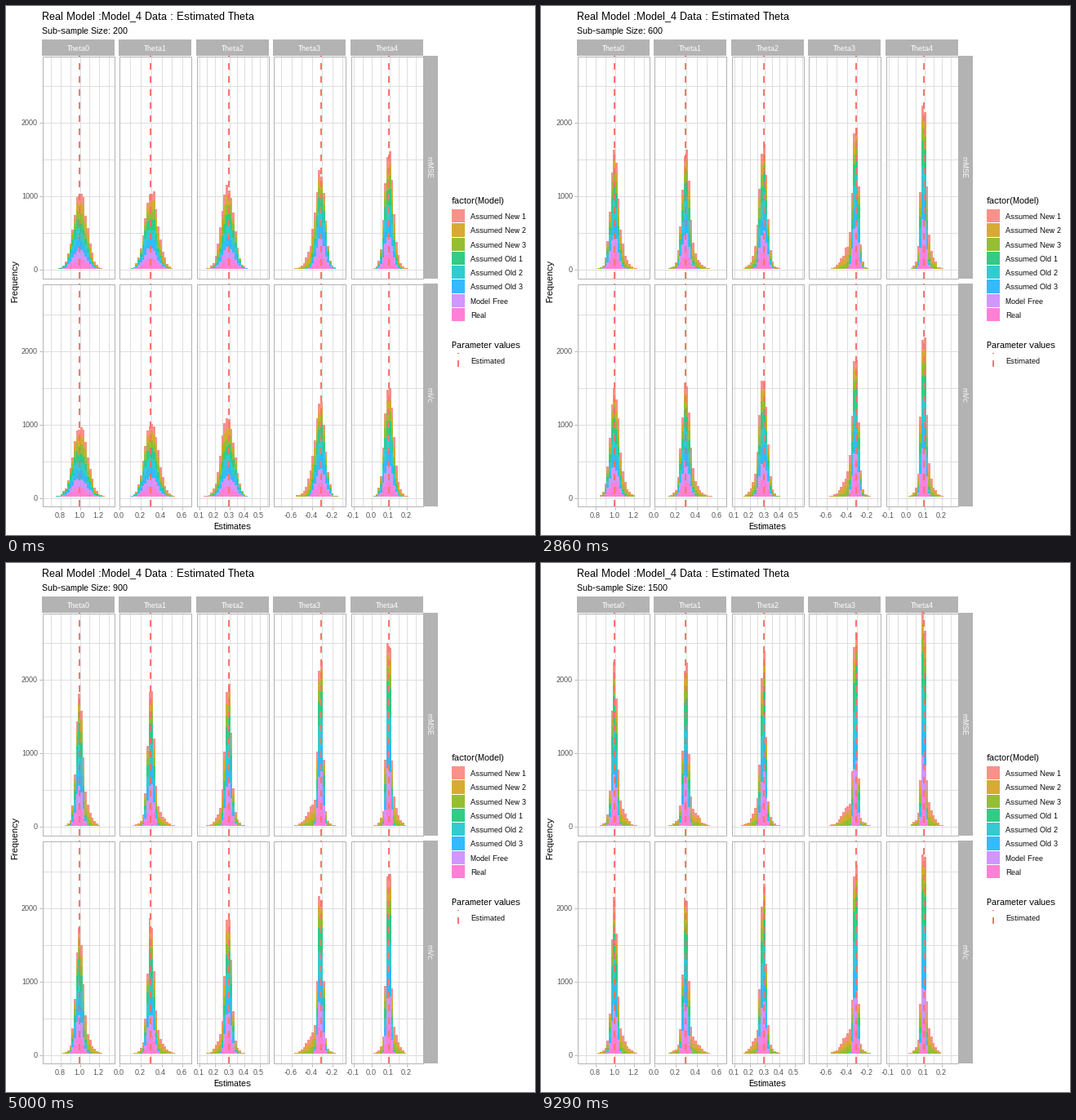
Animation of 648 by 648 pixels, one loop 10000 ms. Source, as a matplotlib script:

```python
import math
import numpy as np
import matplotlib as mpl
import matplotlib.pyplot as plt
from matplotlib.animation import FuncAnimation
from matplotlib.collections import LineCollection, PolyCollection
from matplotlib.patches import Rectangle

mpl.rcParams["font.family"] = "Liberation Sans"
mpl.rcParams["text.hinting"] = "native"
mpl.rcParams["text.hinting_factor"] = 1

SIZE, DPI = 648, 72
LOOP, TICK, STEPS = 10000, 40, 14
GREY, GRID, AXIS_TEXT, RED = "#B3B3B3", "#DEDEDE", "#4D4D4D", "#F8766D"
MODELS = {
    "Assumed New 1": "#F8766D", "Assumed New 2": "#CD9600",
    "Assumed New 3": "#7CAE00", "Assumed Old 1": "#00BE67",
    "Assumed Old 2": "#00BFC4", "Assumed Old 3": "#00A9FF",
    "Model Free": "#C77CFF", "Real": "#FF61CC",
}
LEFT, PITCH, WIDTH = 44.25, 94.45, 89.0
BASES = (322.4, 601.6)
UP, DOWN, SCALE = 261.2, 12.3, 0.09
BINS, BIN_W, INSET = 30, 2.7, 4.05

# per column: reference value, its x, px per unit, major step, labelled values, line x
AXES = [
    (1.0, 90.2, 117.5, 0.2, (0.8, 1.0, 1.2), 90),
    (0.0, 138.8, 128.3, 0.2, (0.0, 0.2, 0.4, 0.6), 177),
    (0.3, 273.4, 183.5, 0.1, (0.1, 0.2, 0.3, 0.4, 0.5), 273),
    (-0.4, 374.3, 125.0, 0.2, (-0.6, -0.4, -0.2), 386),
    (0.0, 447.3, 218.0, 0.1, (-0.1, 0.0, 0.1, 0.2), 469),
]
# per column: centre, spread at size 200, tail shift, tail spread, tail share,
# and widening of the second row
SHAPES = [
    (90.3, 7.9, 4.0, 8.0, 0.82, 1.08),
    (177.7, 7.4, 4.0, 8.8, 0.82, 1.05),
    (272.9, 7.2, -3.0, 8.0, 0.82, 1.03),
    (385.8, 5.45, -6.5, 8.5, 0.82, 1.03),
    (469.2, 4.75, 2.5, 6.8, 0.86, 1.03),
]
NEW_SHIFT = (1.1, 1.25, 0.65)

fig = plt.figure(figsize=(SIZE / DPI, SIZE / DPI), dpi=DPI, facecolor="white")
ax = fig.add_axes([0, 0, 1, 1])
ax.set(xlim=(0, SIZE), ylim=(SIZE, 0))
ax.axis("off")

grid, marks = [], []


def px(v):
    return math.floor(v) + 0.5


def box(x0, y0, x1, y1, z=1, **kw):
    ax.add_patch(Rectangle((x0, y0), x1 - x0, y1 - y0, zorder=z, **kw))


def label(x, y, s, size=9, color="black", ha="left", va="baseline", rot=0):
    return ax.text(x, y, s, size=size, color=color, ha=ha, va=va,
                   rotation=rot, zorder=9)


def dashed(x, bottom, top):
    ax.plot([x, x], [bottom, top], color=RED, lw=2, zorder=5,
            linestyle=(0, (4, 4)), dash_capstyle="butt")


def draw_panel(col, row):
    base = BASES[row]
    left = LEFT + col * PITCH
    x0, x1 = math.floor(left), math.floor(left + WIDTH)
    y0, y1 = math.floor(base - UP), math.floor(base + DOWN)
    ref, ref_x, unit, step, ticks, line_x = AXES[col]
    for k in range(-12, 13):
        gx = px(ref_x + k * step / 2 * unit)
        if x0 <= gx < x1:
            grid.append([(gx, y0), (gx, y1)])
    for n in range(0, 2501, 500):
        gy = px(base + 0.5 - n * SCALE)
        grid.append([(x0, gy), (x1, gy)])
        if col == 0 and n % 1000 == 0:
            marks.append([(41, gy), (44, gy)])
            label(39, gy + 3.5, str(n), color=AXIS_TEXT, ha="right")
    dashed(line_x, y1, y0)
    box(x0 + 0.5, y0 + 0.5, x1 - 0.5, y1 - 0.5, 6, fill=False, ec=GREY, lw=1)
    if row == 0:
        box(x0, 41, x1, 61, fc=GREY, ec="none")
        label(left + WIDTH / 2, 55, f"Theta{col}", color="white", ha="center")
        return
    for v in ticks:
        tx = ref_x + (v - ref) * unit
        marks.append([(px(tx), 614), (px(tx), 617)])
        label(tx - 0.6, 627, f"{v:.1f}", color=AXIS_TEXT, ha="center")


def draw_legend():
    label(546, 242, "factor(Model)", 11)
    for i, (name, color) in enumerate(MODELS.items()):
        y = 249.5 + 17.28 * i
        box(546, math.floor(y), 562, math.floor(y + 17.28) - 1,
            fc=color, ec="none", alpha=0.8)
        label(569, math.floor(y + 12), name)
    label(546, 419, "Parameter values", 11)
    dashed(554, 442, 424.7)
    label(569, 438, "Estimated")


def cdf(x, mu, sd):
    return np.array([0.5 * (1 + math.erf((v - mu) / sd / math.sqrt(2))) for v in x])


def counts(rng, edges, col, row, size):
    """Stack of 8 histograms, 1000 estimates each, in legend order."""
    mu, sd, shift, tail_sd, share, widen = SHAPES[col]
    wide = widen if row else 1
    core = np.diff(cdf(edges, mu, sd * wide * math.sqrt(200 / size)))
    rows = []
    for m in range(len(MODELS)):
        p = core
        if m < 3:
            tail = np.diff(cdf(edges, mu + shift * NEW_SHIFT[m], tail_sd * wide))
            p = (1 - share) * core + share * tail
        rows.append(rng.multinomial(1000, p / p.sum()))
    return np.array(rows)


def bars(size):
    rng = np.random.default_rng(size)
    polys = [[] for _ in MODELS]
    for row, base in enumerate(BASES):
        floor = math.floor(base)
        for col in range(len(AXES)):
            edges = LEFT + INSET + col * PITCH + BIN_W * np.arange(BINS + 1)
            stack = counts(rng, edges, col, row, size)
            # the last model sits at the bottom
            tops = np.cumsum(stack[::-1], axis=0)[::-1]
            ys = np.vstack([floor - np.round(tops * SCALE), np.full(BINS, floor)])
            xs = np.floor(edges)
            for m in range(len(MODELS)):
                for b in range(BINS):
                    l, r, t, d = xs[b], xs[b + 1], ys[m, b], ys[m + 1, b]
                    if d > t:
                        polys[m].append([(l, t), (r, t), (r, d), (l, d)])
    return polys


for r in range(2):
    for c in range(5):
        draw_panel(c, r)
    y0, y1 = math.floor(BASES[r] - UP), math.floor(BASES[r] + DOWN)
    box(511, y0, 529, y1, fc=GREY, ec="none")
    label(517.5, (y0 + y1) / 2, ("mMSE", "mVc")[r], color="white",
          ha="center", va="center", rot=270)
for segments, tint, z in ((grid, GRID, 1), (marks, GREY, 6)):
    ax.add_collection(LineCollection(segments, colors=tint, linewidths=1, zorder=z),
                      autolim=False)
draw_legend()
label(44, 16, "Real Model :Model_4 Data : Estimated Theta", 13)
subtitle = label(44, 34, "", 11)
label(277.5, 641, "Estimates", 11, ha="center")
label(11.5, 337, "Frequency", 11, ha="center", va="center", rot=90)

layers = []
for tint in MODELS.values():
    layer = PolyCollection([], facecolors=tint, edgecolors="none", alpha=0.8,
                           antialiaseds=False, zorder=3)
    ax.add_collection(layer, autolim=False)
    layers.append(layer)

sizes = [200 + 100 * k for k in range(STEPS)]
stacks = [bars(size) for size in sizes]


def update(i):
    # each step begins on the tick that holds its start time
    k = ((i + 1) * TICK - 1) * STEPS // LOOP
    subtitle.set_text(f"Sub-sample Size: {sizes[k]}")
    for layer, polys in zip(layers, stacks[k]):
        layer.set_verts(polys)
    return [subtitle, *layers]


anim = FuncAnimation(fig, update, frames=LOOP // TICK, interval=TICK,
                     repeat=True, repeat_delay=0, blit=False)
plt.show()
```
